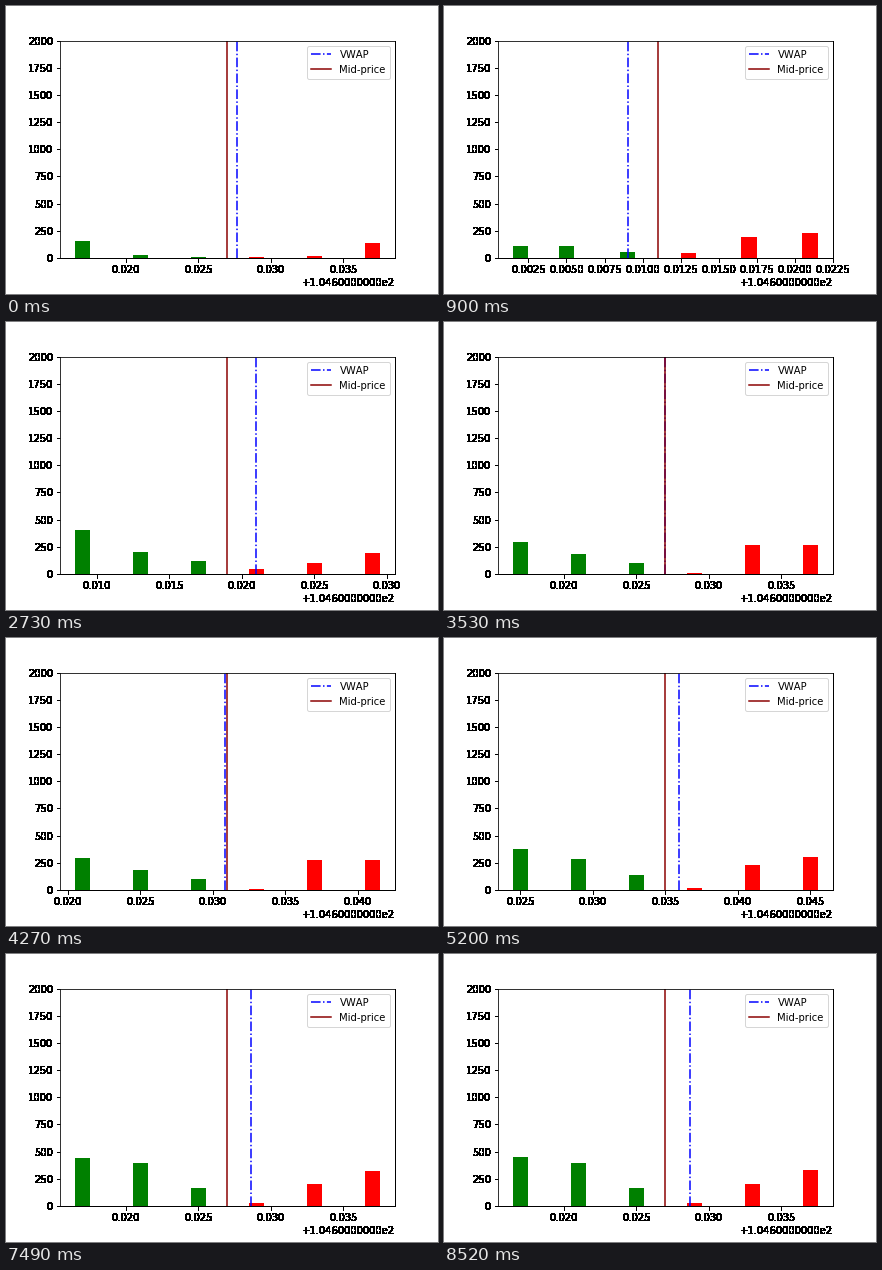
Animation, 432 px wide and 288 px high, one loop 8.55 s. Source, as a matplotlib script:

```python
import numpy as np
import matplotlib.pyplot as plt
from matplotlib.animation import FuncAnimation
from matplotlib.ticker import FuncFormatter, MultipleLocator

LOOP, STEP = 8550, 30
BASE, WIDTH = 104.6, 0.001

# Updates come every 100 ms; a few follow after a short gap instead.
gaps = np.full(90, 100)
gaps[[18, 41, 56, 66, 74, 78, 89]] = 35
TIMES = np.cumsum(gaps) - gaps

# Turning points of the best bid, in 1/256 ticks above 104
TURNS = [0, 850, 2000, 2680, 4130, 4330, 5900, 6200, 6700, 7190]
TICKS = [160, 156, 160, 158, 162, 161, 163, 161, 162, 160]

# Order books (three bids, three asks) that the volumes settle towards
BOOK_TIMES = [0, 1700, 2730, 4270, 8520]
BOOKS = np.array([
    (160, 30, 10, 10, 20, 142),
    (110, 120, 60, 45, 200, 250),
    (405, 200, 120, 45, 100, 190),
    (295, 185, 100, 10, 275, 275),
    (450, 395, 165, 25, 200, 330),
])


def volumes(i):
    k = np.interp(TIMES[i], BOOK_TIMES, range(len(BOOKS)))
    a = min(int(k), len(BOOKS) - 2)
    p = k - a
    ease = 1 - (1 - p) ** 3
    noise = np.random.default_rng(i).normal(0, 0.04, 6)
    vol = BOOKS[a] + (BOOKS[a + 1] - BOOKS[a]) * ease
    return vol * (1 + noise * np.sin(np.pi * p))


def book(i):
    """Prices, volumes, mid-price and VWAP after update i."""
    bid = round(np.interp(TIMES[i], TURNS, TICKS))
    prices = np.array([round(104 + n / 256, 3) - BASE
                       for n in range(bid - 2, bid + 4)])
    vol = volumes(i)
    mid = (prices[2] + prices[3]) / 2
    vwap = np.sum(prices * vol[::-1]) / vol.sum()
    return prices, vol, mid, np.clip(vwap, prices[2], prices[3])


def harden(img, dpi):
    """Make every touched pixel opaque."""
    img[..., 3] = img[..., 3] > 0
    return img, 0, 0


plt.rcParams["font.family"] = "DejaVu Sans"
plt.rcParams["text.kerning_factor"] = 6
fig = plt.figure(figsize=(6, 4), dpi=72, facecolor="white")
fig.subplots_adjust(left=0.125, right=0.9, bottom=0.125, top=0.88)
ax = fig.add_subplot()
ax.set_agg_filter(harden)
ax.set_ylim(0, 2000)

bars = ax.bar(range(6), [0] * 6, WIDTH, color=["green"] * 3 + ["red"] * 3)
vwap_line = ax.axvline(0, color="blue", ls="-.", label="VWAP")
mid_line = ax.axvline(0, color="darkred", label="Mid-price")
ax.legend(loc="upper right")

locator = MultipleLocator(0.005)
digits = 3
formatter = FuncFormatter(lambda x, pos: f"{x:.{digits}f}")
formatter.set_offset_string("+1.0460000000e2")
ax.xaxis.set_major_locator(locator)
ax.xaxis.set_major_formatter(formatter)


def draw(frame):
    global digits
    t = frame * STEP + STEP - 1
    i = np.searchsorted(TIMES, t, side="right") - 1
    prices, vol, mid, vwap = book(i)
    for bar, x, v in zip(bars, prices, vol):
        bar.set_x(x - WIDTH / 2)
        bar.set_height(v)
    vwap_line.set_xdata([vwap, vwap])
    mid_line.set_xdata([mid, mid])

    span = prices[-1] - prices[0] + WIDTH
    margin = WIDTH / 2 + 0.05 * span
    ax.set_xlim(prices[0] - margin, prices[-1] + margin)
    fine = span * 1.1 < 0.0225
    locator.set_params(base=0.0025 if fine else 0.005)
    digits = 4 if fine else 3
    return [*bars, vwap_line, mid_line]


anim = FuncAnimation(fig, draw, frames=LOOP // STEP, interval=STEP,
                     init_func=lambda: draw(0), repeat=True, repeat_delay=0)
plt.show()
```
